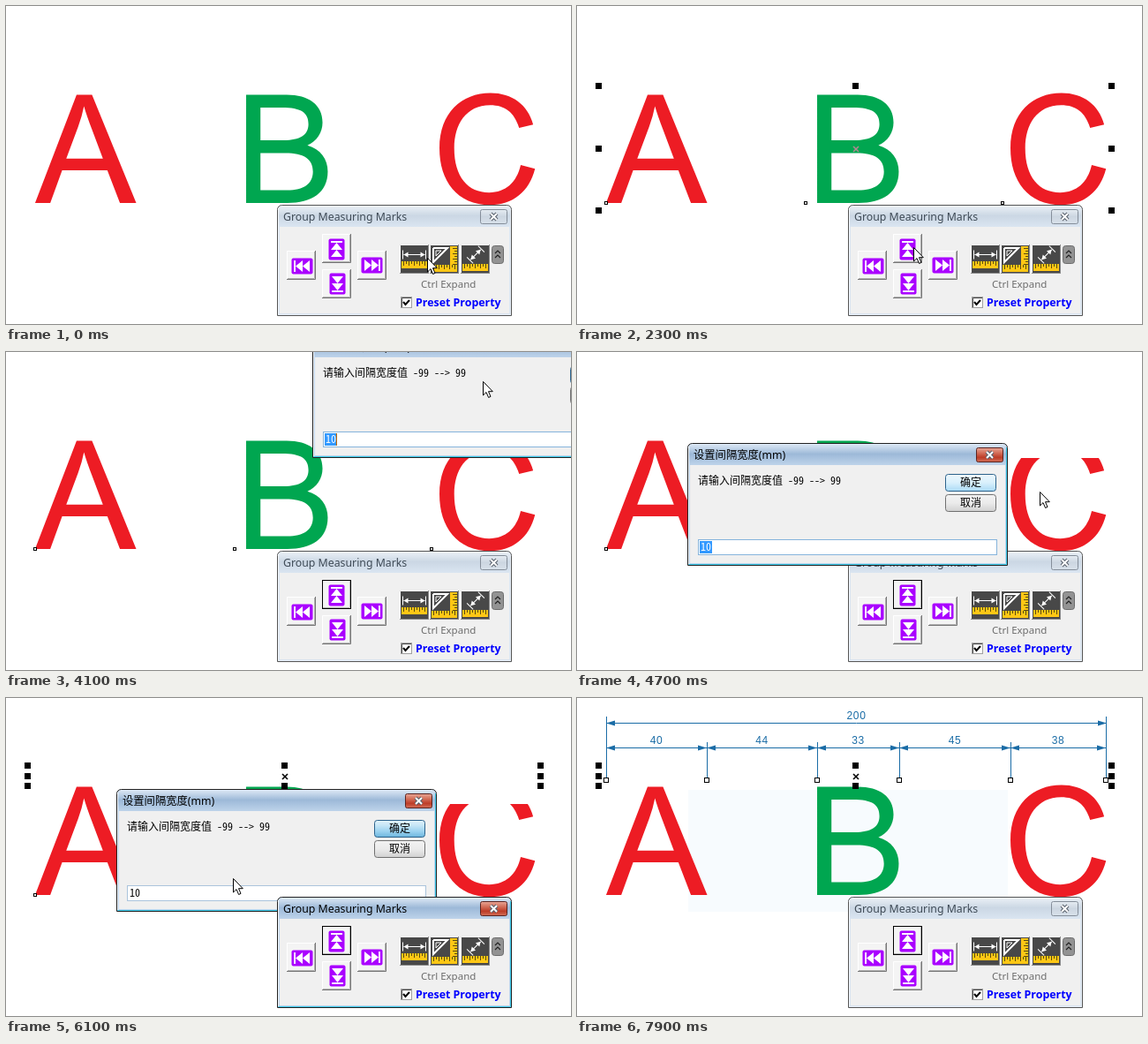
An HTML page with a canvas for the animation above (8000 ms loop, 640 px wide and 360 px high).

```html
<!DOCTYPE html>
<html lang="en">
<head>
<meta charset="utf-8">
<title>Spacing dimensions</title>
<style>
  html, body { margin: 0; width: 100%; height: 100%; overflow: hidden; background: #fff; }
  canvas { display: block; }
</style>
</head>
<body>
<canvas id="stage" width="640" height="360"></canvas>
<script>
const ctx = document.getElementById('stage').getContext('2d');
const LOOP = 8000;
const UI = '"Noto Sans", "Noto Sans CJK SC", "Noto Sans CJK", sans-serif';
const HALF_WIDTH = '"Noto Sans Mono CJK SC", "Noto Sans CJK SC", "Noto Sans CJK", monospace';
const DIM_FONT = '12px "Liberation Sans", sans-serif';
const PURPLE = '#aa00ff', YELLOW = '#ffc715', DIM = '#1a6ca6';

// Letter outlines, y upwards, 2048 units per em.
const LETTERS = [
  [33.2, '#ed1c24', 'M-3,0L560,1466H769L1369,0H1148L977,444H364L203,0Z' +
    'M420,602H917L764,1008Q694,1193 660,1312Q632,1171 581,1032Z'],
  [259.5, '#00a650', 'M150,0V1466H700C1000,1466 1186,1330 1186,1091C1186,960 1110,840 981,780' +
    'C1160,730 1257,590 1257,425C1257,140 1040,0 709,0Z' +
    'M344,850H661C880,850 995,920 995,1068C995,1230 890,1293 637,1293H344Z' +
    'M344,173H709C930,173 1056,260 1056,425C1056,600 930,677 683,677H344Z'],
  [482.5, '#ed1c24', 'M1204,514L1398,465C1320,150 1090,-25 791,-25C340,-25 102,300 102,744' +
    'C102,1220 400,1491 794,1491C1090,1491 1300,1330 1373,1064L1182,1019' +
    'C1115,1230 990,1325 790,1325C460,1325 302,1060 302,745' +
    'C302,350 490,141 775,141C1000,141 1150,280 1204,514Z']
].map(([x, color, d]) => [x, color, new Path2D(d)]);

const ARROW = new Path2D('M0.5,0.5V16L4,12.6L6.6,18.5L9,17.4L6.5,11.7H11.3Z');

// Pointer tip: time, x, y
const POINTER = [
  [0, 477, 285], [500, 227, 163], [700, 127, 130], [1100, 56, 80], [1300, 21, 74],
  [1900, 640, 238], [2100, 470, 262], [2300, 381, 273], [2500, 374, 275], [3100, 374, 275],
  [3500, 341, 121], [4300, 606, 3], [4500, 606, 3], [4700, 524, 158], [4900, 500, 154],
  [5100, 446, 147], [5300, 446, 147], [5500, 377, 100], [5700, 322, 63], [6100, 257, 204],
  [6700, 97, 156], [6900, 11, 90], [7100, 6, 84], [7500, 435, 113], [7700, 645, 131], [8000, 645, 131]
];

function pointerAt(t) {
  const i = POINTER.findIndex(p => p[0] > t);
  const [t0, x0, y0] = POINTER[i - 1], [t1, x1, y1] = POINTER[i];
  const k = (t - t0) / (t1 - t0);
  return [Math.round(x0 + (x1 - x0) * k), Math.round(y0 + (y1 - y0) * k)];
}

function rect(x, y, w, h, color) {
  ctx.fillStyle = color;
  ctx.fillRect(x, y, w, h);
}

function frame(x, y, w, h, color) {
  ctx.strokeStyle = color;
  ctx.lineWidth = 1;
  ctx.strokeRect(x + 0.5, y + 0.5, w - 1, h - 1);
}

function round(x, y, w, h, r, fill, stroke) {
  ctx.beginPath();
  ctx.roundRect(x + 0.5, y + 0.5, w - 1, h - 1, r);
  ctx.fillStyle = fill;
  ctx.fill();
  if (stroke) {
    ctx.strokeStyle = stroke;
    ctx.lineWidth = 1;
    ctx.stroke();
  }
}

function shade(y, h, ...colors) {
  const g = ctx.createLinearGradient(0, y, 0, y + h);
  colors.forEach((c, i) => g.addColorStop(i / (colors.length - 1), c));
  return g;
}

function line(color, width, ...points) {
  ctx.strokeStyle = color;
  ctx.lineWidth = width;
  ctx.beginPath();
  points.forEach(([x, y]) => ctx.lineTo(x, y));
  ctx.stroke();
}

function poly(color, ...points) {
  ctx.fillStyle = color;
  ctx.beginPath();
  points.forEach(([x, y]) => ctx.lineTo(x, y));
  ctx.fill();
}

function text(s, x, y, font, color, align = 'left') {
  ctx.font = font;
  ctx.fillStyle = color;
  ctx.textAlign = align;
  ctx.fillText(s, x, y);
}

function at(x, y, angle, draw) {
  ctx.save();
  ctx.translate(x, y);
  ctx.rotate(angle);
  draw();
  ctx.restore();
}

function letters() {
  for (const [x, color, path] of LETTERS) {
    ctx.save();
    ctx.transform(0.0835, 0, 0, -0.0835, x, 223);
    ctx.fillStyle = color;
    ctx.fill(path, 'evenodd');
    ctx.restore();
  }
}

function node(x, y, size) {
  const left = x - (size >> 1), top = y - (size >> 1);
  rect(left, top, size, size, '#fff');
  frame(left, top, size, size, '#000');
}

function handles(rows, crossColor) {
  rows.forEach((y, i) => [24, 315, 605].forEach(x => {
    if (x !== 315 || i !== 1) rect(x - 3, y - 3, 7, 7, '#000');
  }));
  const y = rows[1] + 1;
  line(crossColor, 1.6, [313, y - 3], [319, y + 3]);
  line(crossColor, 1.6, [313, y + 3], [319, y - 3]);
}

function dimension(x0, x1, y, label) {
  line(DIM, 1, [x0, y + 0.5], [x1, y + 0.5]);
  poly(DIM, [x0, y + 0.5], [x0 + 10, y - 2.5], [x0 + 10, y + 3.5]);
  poly(DIM, [x1, y + 0.5], [x1 - 10, y - 2.5], [x1 - 10, y + 3.5]);
  ctx.letterSpacing = '0.7px';
  text(label, (x0 + x1) / 2, y - 4, DIM_FONT, DIM, 'center');
  ctx.letterSpacing = '0px';
}

function dimensions(withNodes) {
  const xs = [33, 147, 272, 365, 491, 599];
  xs.forEach((x, i) => line(DIM, 1, [x + 0.5, i % 5 ? 50 : 21], [x + 0.5, 94]));
  [40, 44, 33, 45, 38].forEach((n, i) => dimension(xs[i], xs[i + 1], 56, n));
  dimension(33, 600, 28, 200);
  if (withNodes) xs.forEach(x => node(x, 93, 6));
}

function marquee(x0, y0, x1, y1) {
  ctx.setLineDash([4, 3]);
  frame(x0, y0, x1 - x0, y1 - y0, '#3a62c8');
  ctx.setLineDash([]);
}

function windowFrame(x, y, w, h, title, active) {
  round(x, y, w, h, [5, 5, 0, 0], active ? shade(y, 25, '#e3edf8', '#9db9d8', '#bdd3ea')
    : shade(y, 25, '#eef3f8', '#cbd7e4', '#dae5f1'), active ? '#222' : '#555');
  line(active ? '#3dcbea' : '#e6edf5', 1, [x + w - 1.5, y + 5], [x + w - 1.5, y + h - 1.5], [x + 1.5, y + h - 1.5]);
  line('#f5f9fd', 1, [x + 1.5, y + h - 2], [x + 1.5, y + 4]);
  rect(x + 3, y + 25, w - 6, h - 28, '#f0f0f0');
  text(title, x + 7, y + 18, '12.3px ' + UI, active ? '#000' : '#3e4a56');
}

function closeButton(x, y, hot) {
  round(x, y, 31, 17, 2, hot ? shade(y, 17, '#e9ab9c', '#d6745f', '#bd3c27', '#d5755d')
    : shade(y, 17, '#e7edf3', '#ccd6e1', '#d9e2eb'), hot ? '#5b2421' : '#858e9a');
  for (const [color, width] of [['#59616d', 4], ['#fff', 2]]) {
    line(color, width, [x + 12, y + 5], [x + 19, y + 12]);
    line(color, width, [x + 12, y + 12], [x + 19, y + 5]);
  }
}

function arrowButton(x, y, angle, focused) {
  rect(x, y, 33, 33, '#f4f4f4');
  line('#fff', 1, [x + 0.5, y + 32], [x + 0.5, y + 0.5], [x + 32, y + 0.5]);
  line('#777', 1, [x + 32.5, y], [x + 32.5, y + 32.5], [x, y + 32.5]);
  line('#b0b0b0', 1, [x + 31.5, y + 1], [x + 31.5, y + 31.5], [x + 1, y + 31.5]);
  if (focused) frame(x, y, 33, 33, '#000');
  at(x + 17, y + 17, angle, () => {
    round(-12, -9, 25, 19, 2, PURPLE);
    rect(-9, -6, 2, 13, '#fff');
    for (const tip of [-7, 1]) poly('#fff', [tip, 0.5], [tip + 8, -6], [tip + 8, 7]);
  });
}

function ruler(x, y, length, vertical) {
  at(x, y, vertical ? Math.PI / 2 : 0, () => {
    rect(0, 0, length, 8, YELLOW);
    for (let i = 2; i < length; i += 3) rect(i, 0, 1, i % 2 ? 3 : 5, '#5a4a10');
  });
}

function doubleArrow(x, y, half, angle) {
  at(x, y, angle, () => {
    line('#fff', 1, [-half, 0], [half, 0]);
    for (const s of [-1, 1]) {
      poly('#fff', [s * half, 0], [s * (half - 5), -3], [s * (half - 5), 3]);
      line('#fff', 1, [s * (half + 1), -5], [s * (half + 1), 5]);
    }
  });
}

function toolButtons() {
  for (const x of [446, 480, 515]) {
    rect(x, 270, 33, 33, '#484848');
    frame(x, 270, 33, 33, '#8c8c8c');
    line('#f8f8f8', 1, [x + 0.5, 302], [x + 0.5, 270.5], [x + 32, 270.5]);
  }
  doubleArrow(462.5, 281.5, 12, 0);
  ruler(448, 289, 29);
  ruler(511, 272, 29, true);
  ruler(482, 293, 29);
  line('#fff', 2, [484, 274], [500, 274], [484, 290], [484, 274]);
  line('#fff', 1, [487, 277], [493, 277], [487, 283], [487, 277]);
  doubleArrow(532, 281.5, 8, -Math.PI / 4);
  ruler(517, 292, 29);
  round(550, 271, 14, 21, 3, '#939393', '#6c6c6c');
  for (const y of [280, 285]) line('#222', 1.2, [554, y], [557, y - 3], [560, y]);
}

function palette(active, focused) {
  windowFrame(307, 225, 266, 126, 'Group Measuring Marks', active);
  closeButton(537, 230, active);
  arrowButton(318, 277, 0);
  arrowButton(358, 258, Math.PI / 2, focused);
  arrowButton(358, 298, -Math.PI / 2);
  arrowButton(398, 277, Math.PI);
  toolButtons();
  text('Ctrl Expand', 470, 319, '11.5px ' + UI, '#6d6d6d');
  rect(447, 329, 13, 13, '#fff');
  frame(447, 329, 13, 13, '#a0a0a0');
  line('#444', 1, [448.5, 341], [448.5, 330.5], [459, 330.5]);
  line('#000', 2, [450, 335], [452.5, 338], [457, 333]);
  text('Preset Property', 464, 340, 'bold 12.4px ' + UI, '#0000ff');
}

function dialogButton(y, label, fill, border) {
  round(417, y, 58, 20, 3, fill, border);
  text(label, 446, y + 14, '12px ' + UI, '#000', 'center');
}

function dialog(dx, dy, confirmed, caret) {
  ctx.save();
  ctx.translate(dx, dy);
  windowFrame(125, 103, 363, 139, '设置间隔宽度(mm)', true);
  closeButton(452, 108, true);
  text('请输入间隔宽度值 -99 --> 99', 137, 150, '12px ' + HALF_WIDTH, '#000');
  dialogButton(138, '确定', confirmed ? shade(138, 20, '#e5f4fc', '#c4e5f6', '#98d1ef', '#68b3db')
    : shade(138, 20, '#eef8fd', '#d9f0fc', '#a7d9f5'), '#2c628b');
  dialogButton(161, '取消', shade(161, 20, '#f3f3f3', '#ebebeb', '#cfcfcf'), '#707070');
  rect(137, 212, 339, 18, '#fff');
  frame(137, 212, 339, 18, confirmed ? '#abc4dc' : '#86b4dc');
  if (!confirmed) rect(139, 214, 14, 14, '#3399ff');
  if (caret) rect(152, 214, 1, 14, '#cc6600');
  text('10', 140, 225, '12px ' + HALF_WIDTH, confirmed ? '#000' : '#fff');
  ctx.restore();
}

function pointer(x, y, dark) {
  at(x, y, 0, () => {
    ctx.fillStyle = dark ? '#000' : '#fff';
    ctx.strokeStyle = dark ? '#fff' : '#000';
    ctx.lineWidth = 1;
    ctx.fill(ARROW);
    ctx.stroke(ARROW);
  });
}

function draw(now) {
  const time = now % LOOP;
  const t = time < 100 ? 0 : Math.floor((time - 100) / 200) * 200 + 100;
  const during = (from, to) => t >= from && t < to;
  const [px, py] = pointerAt(t);

  rect(0, 0, 640, 360, '#fff');
  if (t >= 6300) rect(126, 104, 362, 138, '#f7fbfe');
  letters();
  if (t >= 6300) dimensions(t >= 7900);
  if (during(4700, 6300)) rect(347, 0, 293, 120, '#fff');
  if (during(2100, 6300)) [33, 259, 482].forEach(x => node(x, 223, 4));
  if (during(2100, 2900)) handles([90, 161, 231], '#b08890');
  if (during(5900, 6300) || t >= 7900) handles([76, 88, 99], '#000');
  if (during(1500, 2100)) marquee(21, 74, px, py);
  if (during(7300, 7900)) marquee(6, 84, px, py);

  const paletteActive = during(2500, 2900) || during(5700, 6300);
  const showPalette = () => palette(paletteActive, t >= 2500);
  const showDialog = () => {
    if (!during(2900, 6300)) return;
    const docked = t < 4700;
    dialog(docked ? 222 : 0, docked ? -122 : 0, t >= 5300, docked && t % 1000 < 500);
  };
  (paletteActive ? [showDialog, showPalette] : [showPalette, showDialog]).forEach(show => show());
  pointer(px, py, t >= 6500);
}

const start = performance.now();
function tick() {
  draw(performance.now() - start);
  requestAnimationFrame(tick);
}
tick();
</script>
</body>
</html>
```
